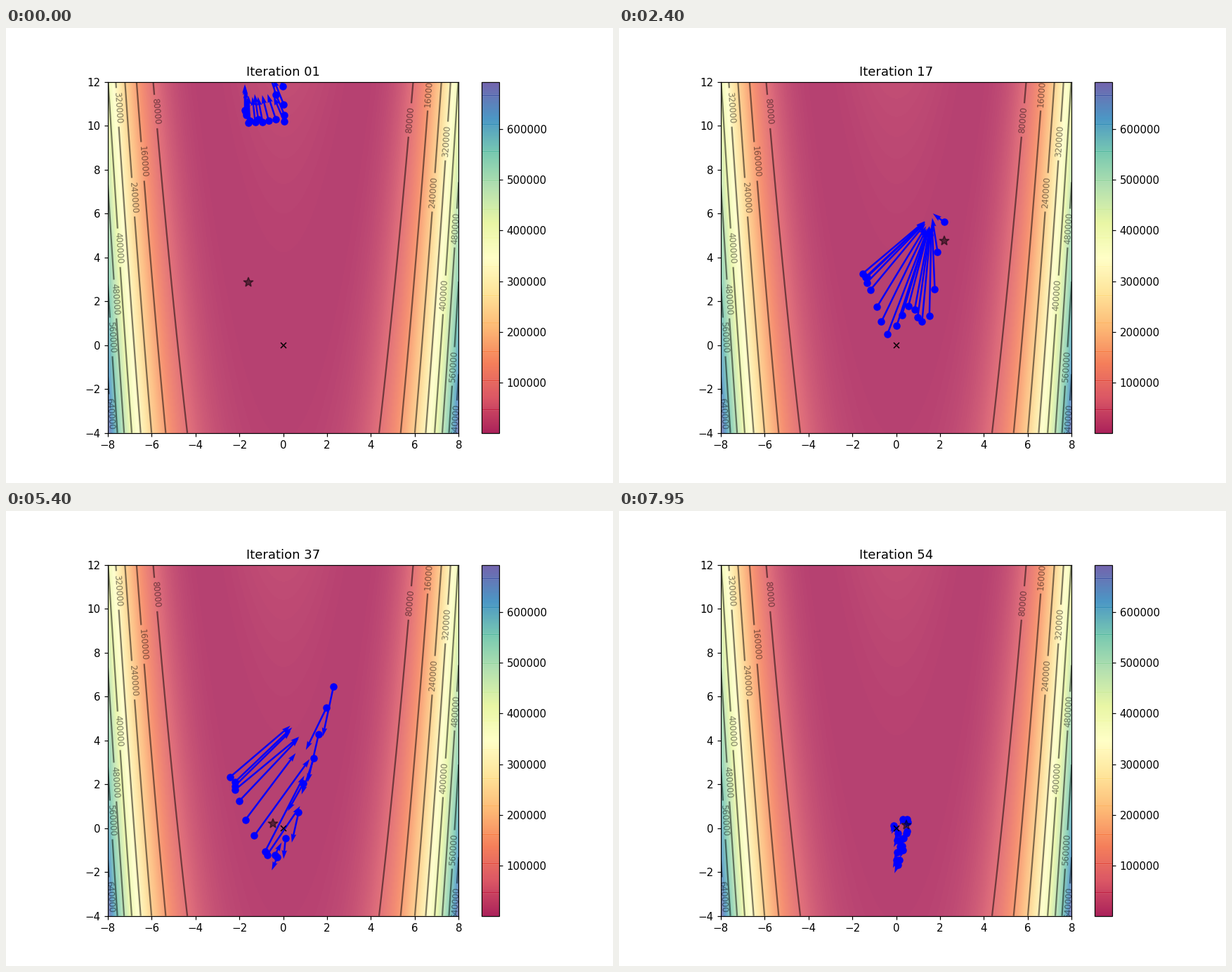
Animation of 864x648 px, one loop 8000 ms. Source, as a matplotlib script:

```python
import numpy as np
import matplotlib.pyplot as plt
from matplotlib.animation import FuncAnimation
from matplotlib.cm import ScalarMappable
from matplotlib.colors import Normalize

plt.rcParams["font.family"] = "DejaVu Sans"

W, H = 864, 648
LEFT, BOTTOM, SIZE = 144.7, 71.35, 499.7
UNIT = SIZE / 16                    # pixels per data unit
PARTICLES = 18
STEP = 0.1                          # share of the velocity moved per iteration
TICK_MS, TICKS_PER_ITERATION, TICKS = 50, 3, 160


def cost(x, y):
    return x**2 + 150 * (y - x**2) ** 2


def to_data(px, py):
    """Stage pixels (y down) to plot coordinates."""
    return (px - LEFT) / UNIT - 8, (H - BOTTOM - py) / UNIT - 4


rng = np.random.default_rng(7)


def pose(chain, gain, centre):
    """Particles strung loosely along a chain of points. Their arrows point
    to the centre (negative gain) or away from it (positive gain)."""
    chain = np.array(chain, float)
    u = np.linspace(0, len(chain) - 1, PARTICLES)
    place = np.column_stack([np.interp(u, range(len(chain)), c) for c in chain.T])
    place += rng.normal(0, 2.5, place.shape)
    return place, np.array(gain) * (place - centre)


# Iteration and swarm shape, in stage pixels
key_poses = {
    0: pose([(340, 116), (345, 134), (363, 132), (403, 134), (388, 88), (440, 45)],
            (-0.27, 0.05), (340, 850)),
    10: pose([(331, 361), (336, 378), (368, 500), (400, 415), (436, 480), (460, 285)],
             (-0.37, -0.75), (440, 275)),
    16: pose([(348, 350), (354, 360), (380, 440), (415, 390), (440, 430), (462, 275)],
             (-0.9, -0.85), (445, 262)),
    24: pose([(349, 364), (353, 376), (384, 458), (428, 410), (462, 306), (511, 148)],
             (1.1, 0.9), (462, 270)),
    30: pose([(332, 401), (336, 414), (366, 490), (405, 452), (439, 350), (457, 258)],
             (1.8, 1.3), (425, 375)),
    42: pose([(380, 334), (384, 346), (406, 400), (401, 458), (430, 368), (457, 280)],
             (-0.85, -0.75), (460, 250)),
    53: pose([(392, 448), (401, 470), (396, 508), (401, 475), (411, 455), (412, 440)],
             (0.05, 0.05), (490, 270)),
}
key_times = list(key_poses)

# Best point so far: first iteration, x, y
bests = [(0, -1.6, 2.88), (5, 2.18, 4.76), (24, -0.45, 0.22), (40, 0.45, 0.16)]


def swarm(t):
    """Positions and velocities, in pixels, on a cubic path between poses."""
    k = min(np.searchsorted(key_times, t, side="right"), len(key_times) - 1)
    t0, t1 = key_times[k - 1], key_times[k]
    (p0, v0), (p1, v1) = key_poses[t0], key_poses[t1]
    reach = (t1 - t0) * STEP
    s = (t - t0) / (t1 - t0)
    a = v0 * reach
    b = 3 * (p1 - p0) - (2 * v0 + v1) * reach
    c = 2 * (p0 - p1) + (v0 + v1) * reach
    return p0 + s * (a + s * (b + s * c)), (a + s * (2 * b + 3 * s * c)) / reach


fig = plt.figure(figsize=(8, 6), dpi=108)
ax = fig.add_axes([LEFT / W, BOTTOM / H, SIZE / W, SIZE / H])
cax = fig.add_axes([677.16 / W, BOTTOM / H, SIZE / 20 / W, SIZE / H])

# Cost surface and colour scale
shade = ScalarMappable(Normalize(0, cost(8, -4)), "Spectral")
cells = (np.arange(500) + 0.5) * 16 / 500
surface = cost(*np.meshgrid(cells - 8, cells - 4))
ax.imshow(shade.to_rgba(surface, alpha=0.75, bytes=True), extent=(-8, 8, -4, 12),
          origin="lower", aspect="auto", interpolation="nearest", zorder=0)
bar = fig.colorbar(shade, cax=cax, alpha=0.75, format="%d",
                   ticks=np.arange(100000, 600001, 100000))
bar.solids.set(edgecolor="face", linewidth=0.5)

# Contour lines, each labelled once per side at a given pixel height
levels = np.arange(1, 9) * 80000
label_heights = {-1: (119, 190, 241, 113, 313, 386, 440, 549),
                 1: (131, 90, 234, 161, 380, 285, 482, 558)}
gx, gy = np.meshgrid(np.linspace(-8, 8, 321), np.linspace(-4, 12, 161))
lines = ax.contour(gx, gy, cost(gx, gy), levels=levels, colors="black", alpha=0.5,
                   linewidths=1.5)
spots = []
for side, heights in label_heights.items():
    for level, height in zip(levels, heights):
        y = to_data(0, height)[1]
        spots.append((side * np.sqrt(y + np.sqrt(level / 150)), y))
ax.clabel(lines, fontsize=8, fmt="%d", inline=True, manual=spots)

# Swarm
start = np.zeros(PARTICLES)
arrows = ax.quiver(start, start, start, start, color="blue", width=0.005,
                   angles="xy", scale_units="xy", scale=1, zorder=2)
dots, = ax.plot([], [], "o", color="blue", ms=6, zorder=2)
ax.plot(0, 0, "x", color="black", ms=5, zorder=3)
star, = ax.plot([], [], "*", color="black", ms=9.5, alpha=0.5, zorder=4)
ax.set(xlim=(-8, 8), ylim=(-4, 12),
       xticks=np.arange(-8, 9, 2), yticks=np.arange(-4, 13, 2))
title = ax.set_title("", fontsize=12)


def update(tick):
    t = tick // TICKS_PER_ITERATION
    place, velocity = swarm(t)
    x, y = to_data(*place.T)
    dots.set_data(x, y)
    arrows.set_offsets(np.column_stack([x, y]))
    arrows.set_UVC(velocity[:, 0] / UNIT, -velocity[:, 1] / UNIT)
    _, best_x, best_y = [b for b in bests if b[0] <= t][-1]
    star.set_data([best_x], [best_y])
    title.set_text(f"Iteration {t + 1:02d}")
    return dots, arrows, star, title


anim = FuncAnimation(fig, update, frames=TICKS, interval=TICK_MS, repeat=True,
                     repeat_delay=0)
plt.show()
```
